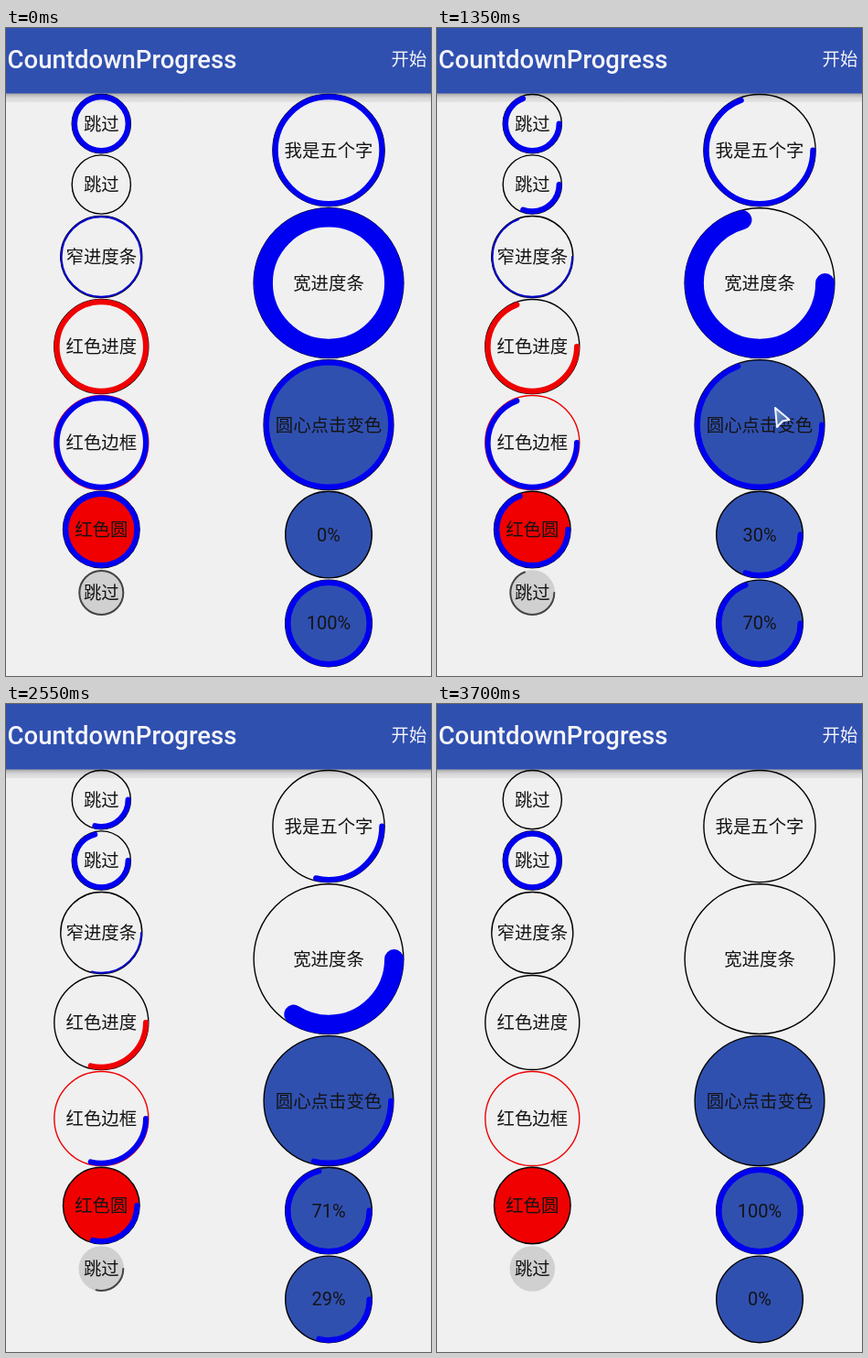
Write an HTML page that moves like this. It is 465 px wide and 708 px high and loops after 3.75 s.

```html
<!DOCTYPE html>
<html lang="zh">
<head>
<meta charset="utf-8">
<title>CountdownProgress</title>
<style>
  html, body { margin: 0; width: 100%; height: 100%; overflow: hidden; background: #f0f0f0; }
  svg { display: block; width: 465px; height: 708px; }
  text { font-family: Roboto, "Noto Sans CJK SC", "Noto Sans CJK", sans-serif; font-size: 19.4px; }
  .label { fill: #141414; text-anchor: middle; }
  .num { font-size: 20px; }
  .bar { fill: #f4f4f8; }
</style>
</head>
<body>
<svg id="stage" viewBox="0 0 465 708">
  <defs>
    <linearGradient id="shade" x1="0" y1="0" x2="0" y2="1">
      <stop offset="0" stop-color="#a2a2a2"/>
      <stop offset=".3" stop-color="#c2c2c2"/>
      <stop offset=".55" stop-color="#d8d8d8"/>
      <stop offset="1" stop-color="#e4e4e4"/>
    </linearGradient>
    <linearGradient id="steel" x1="0" y1="0" x2="1" y2="1">
      <stop offset="0" stop-color="#7f9fd8"/>
      <stop offset="1" stop-color="#234c98"/>
    </linearGradient>
  </defs>
  <rect width="465" height="708" fill="#f0f0f0"/>
  <rect y="71" width="465" height="10" fill="url(#shade)"/>
  <rect width="465" height="71.5" fill="#3050b0"/>
  <circle id="ripple" cx="441" cy="33" fill="#554eac"/>
  <text class="bar" x="1.6" y="43.5" style="font-size:27.5px;font-weight:500">CountdownProgress</text>
  <text class="bar" x="441" y="41" text-anchor="middle">开始</text>
  <g id="dials"></g>
  <path id="cursor" d="M0 0L15.5 13L8 14.5L2 21Z" fill="url(#steel)" stroke="#f2f6ff" stroke-width="2" stroke-linejoin="round"/>
</svg>
<script>
const LOOP = 3750, STEP = 50;
const BLUE = '#0000f0', RED = '#f00000', INDIGO = '#3050b0';
const LEFT = 104.3, RIGHT = 353;

const DIALS = [
  { x: LEFT, y: 104.6, r: 32.8, text: '跳过' },
  { x: LEFT, y: 171, r: 32.8, text: '跳过', up: true },
  { x: LEFT, y: 250, r: 45.2, text: '窄进度条', w: 2, color: '#0000d0' },
  { x: LEFT, y: 348, r: 52.2, text: '红色进度', color: RED },
  { x: LEFT, y: 453, r: 52.2, text: '红色边框', line: RED },
  { x: LEFT, y: 548, r: 42.5, text: '红色圆', fill: RED },
  { x: LEFT, y: 617, r: 25.5, text: '跳过', w: 2, color: '#444', fill: '#d0d0d0', line: 'none' },
  { x: RIGHT, y: 133.6, r: 61.8, text: '我是五个字' },
  { x: RIGHT, y: 278.6, r: 82.6, text: '宽进度条', w: 21, slow: true },
  { x: RIGHT, y: 433.5, r: 71.6, text: '圆心点击变色', fill: INDIGO },
  { x: RIGHT, y: 553.6, r: 48, fill: INDIGO, up: true },
  { x: RIGHT, y: 650.4, r: 48, fill: INDIGO }
];

// Keyframe rows: time, then values
const MAIN = [[442, 0], [3405, 1]];
const SLOW = [[442, 0], [650, .07], [1350, .293], [1800, .443], [2550, .66], [3050, .798], [3690, 1]];
const CURSOR = [[700, 441, 40], [1000, 394, 260], [1350, 370, 415], [1800, 354, 538], [2100, 400, 590], [2400, 470, 606]];
const RIPPLE = [[450, 0, 0], [550, 22, .6], [650, 28, .6], [850, 28, 0]];

const $ = id => document.getElementById(id);

function make(tag, attrs, parent) {
  const el = document.createElementNS('http://www.w3.org/2000/svg', tag);
  for (const k in attrs) el.setAttribute(k, attrs[k]);
  return parent.appendChild(el);
}

function sample(rows, t) {
  if (t <= rows[0][0]) return rows[0].slice(1);
  for (let i = 1; i < rows.length; i++) {
    const a = rows[i - 1], b = rows[i];
    if (t <= b[0]) {
      const k = (t - a[0]) / (b[0] - a[0]);
      return a.slice(1).map((v, j) => v + (b[j + 1] - v) * k);
    }
  }
  return rows[rows.length - 1].slice(1);
}

for (const d of DIALS) {
  const { x, y, r, w = 6, color = BLUE, fill = 'none', line = '#000' } = d;
  const g = $('dials');
  make('circle', { cx: x, cy: y, r: r - .7, fill, stroke: line, 'stroke-width': 1.4 }, g);
  d.label = make('text', { x, y: y + 7, class: d.text ? 'label' : 'label num' }, g);
  d.label.textContent = d.text || '';
  d.arc = make('circle', {
    cx: x, cy: y, r: r - .5 - w / 2, fill: 'none', stroke: color,
    'stroke-width': w, 'stroke-linecap': 'round', pathLength: 1
  }, g);
}

function draw(t) {
  const [main] = sample(MAIN, t), [slow] = sample(SLOW, t);
  for (const d of DIALS) {
    const p = d.slow ? slow : main;
    const part = d.up ? p : 1 - p;
    d.arc.style.display = part > 0 ? '' : 'none';
    d.arc.setAttribute('stroke-dasharray', part < 1 ? part + ' 2' : 'none');
    if (!d.text) {
      const done = Math.floor(p * 100 + 1e-6);
      d.label.textContent = (d.up ? done : 100 - done) + '%';
    }
  }
  const [radius, alpha] = sample(RIPPLE, t);
  $('ripple').setAttribute('r', radius);
  $('ripple').setAttribute('opacity', alpha);
  const [cx, cy] = sample(CURSOR, t);
  $('cursor').setAttribute('transform', `translate(${cx} ${cy})`);
  $('cursor').style.display = t > 700 && t < 2400 ? '' : 'none';
}

const start = performance.now();
function tick() {
  const t = (performance.now() - start) % LOOP;
  draw(Math.floor(t / STEP) * STEP);
  requestAnimationFrame(tick);
}
draw(0);
requestAnimationFrame(tick);
</script>
</body>
</html>
```
